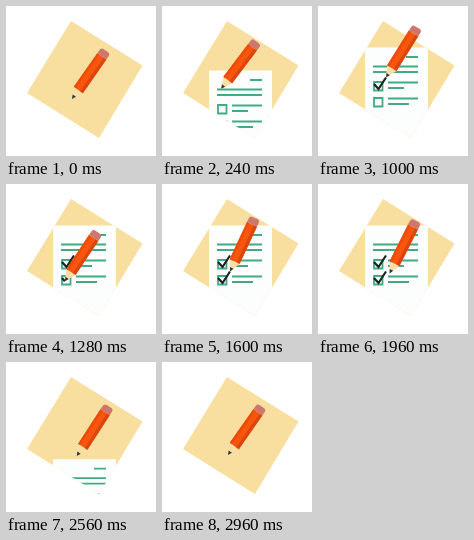
Recreate the animation shown at these times as an HTML page. Size 150 px wide and 150 px high, loop 3000 ms.

```html
<!DOCTYPE html>
<html>
<head>
<meta charset="utf-8">
<style>
html, body { margin: 0; width: 100%; height: 100%; overflow: hidden; background: #fff; }
svg { display: block; width: 100vw; height: 100vh; }
</style>
</head>
<body>
<svg viewBox="0 0 150 150">
  <clipPath id="tile"><path id="square" d="M65 15L136.5 59.5 93 132 21 87Z"/></clipPath>
  <use href="#square" fill="#f8dfa0"/>
  <g clip-path="url(#tile)">
    <g id="paper">
      <path d="M47 41.5H110V140H47Z" fill="#fcfdfd"/>
      <g fill="none" stroke="#43aa83" stroke-width="1.8">
        <path d="M88 51H100M55 60.5H100M55 66H100M70 76.5H100M70 82H86M70 92.5H100M70 98H91"/>
        <path d="M56 76h8.5v8.5h-8.5ZM56 92h8.5v8.5h-8.5Z"/>
      </g>
      <g id="checks" fill="none" stroke="#1d2422" stroke-width="2.2"/>
    </g>
  </g>
  <g id="pencil">
    <path d="M0 0L-5.5 -11H5.5Z" fill="#f7dfa6"/>
    <path d="M0 0L-2 -4H2Z" fill="#30383a"/>
    <path d="M-5.5 -11H5.5V-52H-5.5Z" fill="#f8560c"/>
    <path d="M-5.5 -11H-3V-52H-5.5Z" fill="#ee4b0b"/>
    <path d="M2.2 -11H5.5V-52H2.2Z" fill="#dc450e"/>
    <path d="M-5.5 -52V-56Q-5.5 -59 -2.5 -59H2.5Q5.5 -59 5.5 -56V-52Z" fill="#cf776c"/>
  </g>
</svg>
<script>
const LOOP = 3000, STEP = 40, DROP = 92;
const [paper, pencil, checks] = ['paper', 'pencil', 'checks'].map(id => document.getElementById(id));

const smooth = u => u * u * (3 - 2 * u);
const easeOut = u => 1 - (1 - u) ** 2;
const progress = (t, from, to) => Math.min(1, Math.max(0, (t - from) / (to - from)));

function makePath(d) {
  const path = document.createElementNS('http://www.w3.org/2000/svg', 'path');
  path.setAttribute('d', d);
  return path;
}

// The pencil runs along each path in turn, tilting towards its lean.
const glide = (end, lean, d) => ({ end, lean, path: makePath(d), ease: smooth });
function tick(end, lean, row) {
  const path = makePath(`M56 ${78 + 16 * row}l4.5 5 7.5 -11.5`);
  checks.append(path);
  return { end, lean, path, ease: easeOut, ink: true };
}
const moves = [
  glide(360, 38, 'M66 93L56 78'),
  tick(1000, 32, 0),
  glide(1240, 36, 'M68 71.5L56 94'),
  tick(1600, 25, 1),
  glide(2960, 35, 'M68 87.5Q88 98 66 93')
];
moves.forEach((move, i) => {
  const last = moves[i - 1] || { end: STEP, lean: 35 };
  move.start = last.end;
  move.tilt = last.lean;
  move.length = move.path.getTotalLength();
});

function draw(now) {
  const t = Math.floor(now % LOOP / STEP) * STEP;
  const part = move => move.ease(progress(t, move.start, move.end));

  const move = moves.find(m => t <= m.end) || moves[moves.length - 1];
  const u = part(move);
  const { x, y } = move.path.getPointAtLength(u * move.length);
  const angle = move.tilt + (move.lean - move.tilt) * u;
  pencil.setAttribute('transform', `translate(${x} ${y}) rotate(${angle})`);

  for (const m of moves.filter(m => m.ink)) {
    m.path.setAttribute('stroke-dasharray', `${part(m) * m.length} 99`);
    m.path.setAttribute('visibility', t > m.start ? 'visible' : 'hidden');
  }

  const shift = DROP * (1 - easeOut(progress(t, 40, 440)) + progress(t, 2104, 2690) ** 2);
  paper.setAttribute('transform', `translate(0 ${shift})`);
}

const start = performance.now();
function frame() {
  draw(performance.now() - start);
  requestAnimationFrame(frame);
}
frame();
</script>
</body>
</html>
```
